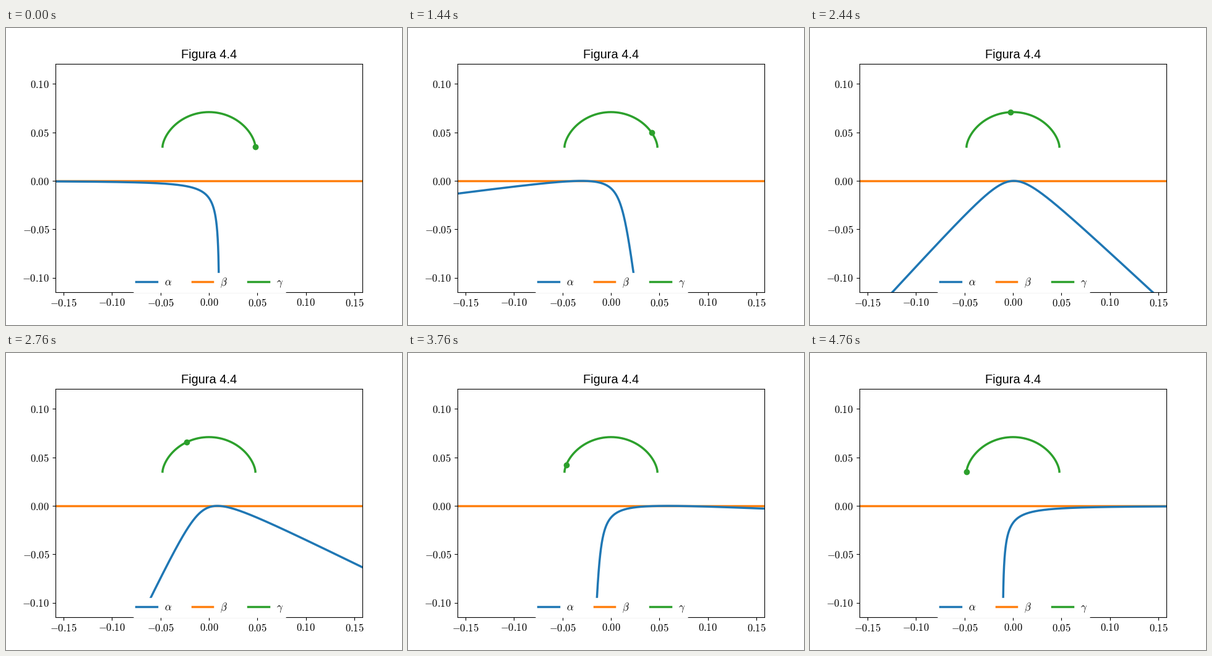
A matplotlib script that plays this animation: 640x480 px, repeating every 4840 ms.

```python
import numpy as np
import matplotlib.pyplot as plt
from matplotlib.animation import FuncAnimation

plt.rcParams.update({
    "font.family": "Liberation Sans",
    "font.size": 12,
    "mathtext.fontset": "cm",
    "lines.linewidth": 2.5,
    "xtick.major.pad": 2.8,
})

STEPS = 120   # steps from one asymptote to the other
FINE = 10     # integration samples per step
R = 0.071     # distance from the pole to the vertex
K = 2.011     # angular factor of the rolling curve


def tilt(phi):
    """Rotation that lays the tangent at phi flat on the line."""
    return np.arctan2(K * np.sin(phi), np.cos(phi)) - phi / K


def roulette():
    """Path of the pole of r = R sec(K theta) rolling on a line, phi = K theta."""
    phi = np.linspace(-np.pi / 2, np.pi / 2, STEPS * FINE + 1)
    q = 1 + (K * K - 1) * np.sin(phi) ** 2
    height = R / np.sqrt(q)
    speed = height * (K / q - 1 / K)
    area = np.cumsum((speed[1:] + speed[:-1]) / 2) * (phi[1] - phi[0])
    x = -np.concatenate([[0], area])
    return phi[::FINE], (x - x[-1] / 2)[::FINE], height[::FINE]


phis, pole_x, pole_y = roulette()

# rolling curve relative to its pole, vertex straight down
p = np.linspace(-np.pi / 2 + 0.01, np.pi / 2 - 0.01, 1200)
r = R / np.cos(p)
body_x, body_y = r * np.sin(p / K), -r * np.cos(p / K)

fig, ax = plt.subplots(figsize=(6.4, 4.8), dpi=100)
ax.set_xlim(-0.15835, 0.15835)
ax.set_ylim(-0.115, 0.121)


def set_ticks(axis, count):
    values = np.arange(-count, count + 1) * 0.05
    axis.set_ticks(values, [f"${v:.2f}$" for v in values])


set_ticks(ax.xaxis, 3)
set_ticks(ax.yaxis, 2)
ax.set_title("Figura 4.4", fontsize=14.4)

alpha, = ax.plot([], [], "C0", label=r"$\alpha$", zorder=2.2)
ax.plot([-0.2, 0.2], [0, 0], "C1", label=r"$\beta$")
ax.plot(pole_x, pole_y, "C2", label=r"$\gamma$")
dot, = ax.plot([], [], "C2o", zorder=2.3)
ax.legend(loc="lower center", bbox_to_anchor=(0.502, 0), ncol=3,
          borderaxespad=0, borderpad=0.33, handletextpad=0.72,
          framealpha=1, edgecolor="white")


def draw(i):
    c, s = np.cos(tilt(phis[i])), np.sin(tilt(phis[i]))
    alpha.set_data(pole_x[i] + c * body_x - s * body_y,
                   pole_y[i] + s * body_x + c * body_y)
    dot.set_data([pole_x[i]], [pole_y[i]])
    return alpha, dot


anim = FuncAnimation(fig, draw, frames=STEPS + 1, interval=40,
                     repeat=True, repeat_delay=0)
plt.show()
```
